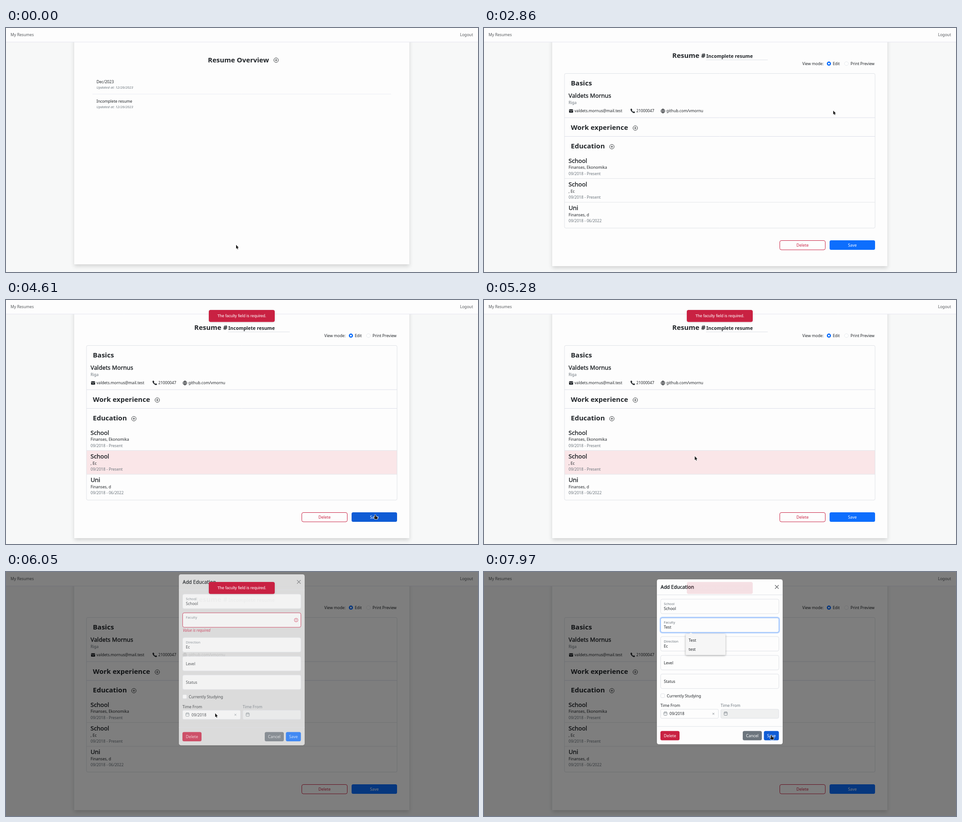
Animation of 1038x539 px, one loop 8 s. Source, as an HTML page with a canvas:

```html
<!DOCTYPE html>
<html lang="en">
<head>
<meta charset="utf-8">
<title>Resume editor</title>
<style>
  html, body { margin: 0; height: 100%; overflow: hidden; background: #f7f8f8; }
  canvas { display: block; }
</style>
</head>
<body>
<canvas id="stage" width="1038" height="539"></canvas>
<script>
const ctx = document.getElementById('stage').getContext('2d');
const LOOP = 8000;
const INK = '#212529', GRAY = '#6c757d', LINE = '#dfe2e7', RED = '#c92142';
const BLUE = '#0d6efd', DEEP_BLUE = '#0f5cd5', WHITE = '#fdfdfd';

// Times of the story, in ms
const OPEN_PAGE = 2350, SAVE = 3800, OPEN_MODAL = 5790, FOCUS = 6590, MENU = 6630;
const KEYS = [6920, 7010, 7100, 7190], TOAST_OUT = 7800;

// Pointer stops: time, x, y
const STOPS = [
  [30, 506, 479], [1800, 766, 169], [2760, 766, 169], [3560, 812, 475],
  [4610, 812, 475], [5280, 463.5, 345], [5900, 463.5, 345],
  [6530, 439, 117], [7330, 439, 117], [7940, 632, 361]
];

const HAND = new Path2D('M-1.2 .6Q-1.2-.5 0-.5T1.2 .6V3.2L4.6 4Q5.6 4.4 5.4 5.6L4.4 9.3H-.4L-3.2 6Q-3.6 4.8-2.6 4.6L-1.2 5.4Z');
const ARROW = new Path2D('M0 0V8.6L1.9 6.9 3.2 9.8 4.6 9.2 3.3 6.3H5.9Z');
const PHONE = new Path2D('M.6 1Q2-.6 2.8 .6L4 2.4Q4.2 3 3.2 4 4.4 6.2 6.4 7.2 7.4 6 8 6.3L9.8 7.4Q10.4 8 9.4 9.2 8.4 10.4 6.4 9.6 1.8 7.4 .3 3 0 1.8 .6 1Z');

let mouse, active, cursor;

const clamp = v => Math.min(1, Math.max(0, v));
const progress = (t, start, length) => clamp((t - start) / length);

function pointerAt(t) {
  let i = STOPS.findIndex(s => s[0] > t);
  if (i < 0) return STOPS[STOPS.length - 1].slice(1);
  if (i === 0) return STOPS[0].slice(1);
  const [t0, x0, y0] = STOPS[i - 1], [t1, x1, y1] = STOPS[i];
  const p = (t - t0) / (t1 - t0), e = p * p * (3 - 2 * p);
  return [x0 + (x1 - x0) * e, y0 + (y1 - y0) * e];
}

function over(x, y, w, h) {
  const [mx, my] = mouse;
  return active && mx >= x && mx <= x + w && my >= y && my <= y + h;
}

function text(s, x, y, { size = 8.6, color = INK, weight = 400, style = 'normal', align = 'left', family = '"Noto Sans", "Open Sans"' } = {}) {
  const medium = weight === 500;
  ctx.font = `${style} ${medium ? 400 : weight} ${size}px ${family}, sans-serif`;
  ctx.textAlign = align;
  ctx.fillStyle = color;
  ctx.fillText(s, x, y);
  if (medium) {
    ctx.strokeStyle = color;
    ctx.lineWidth = 0.4;
    ctx.strokeText(s, x, y);
  }
}

const heading = (s, x, y) => text(s, x, y, { size: 15, weight: 700 });

function box(x, y, w, h, fill, stroke, r = 3.5, width = 1) {
  ctx.beginPath();
  ctx.roundRect(x, y, w, h, r);
  if (fill) { ctx.fillStyle = fill; ctx.fill(); }
  if (stroke) { ctx.strokeStyle = stroke; ctx.lineWidth = width; ctx.stroke(); }
}

function shadowBox(x, y, w, h, fill, alpha, dy, blur, r = 0) {
  ctx.save();
  ctx.shadowColor = `rgba(0,0,0,${alpha})`;
  ctx.shadowOffsetY = dy;
  ctx.shadowBlur = blur;
  box(x, y, w, h, fill, null, r);
  ctx.restore();
}

function line(color, width, ...pts) {
  ctx.beginPath();
  for (let i = 0; i < pts.length; i += 4) {
    ctx.moveTo(pts[i], pts[i + 1]);
    ctx.lineTo(pts[i + 2], pts[i + 3]);
  }
  ctx.strokeStyle = color;
  ctx.lineWidth = width;
  ctx.stroke();
}

function circle(x, y, r, fill, stroke, width = 1) {
  box(x - r, y - r, 2 * r, 2 * r, fill, stroke, r, width);
}

function plus(x, y, color = INK) {
  circle(x, y, 5, null, color, 0.9);
  line(color, 0.9, x - 2.6, y, x + 2.6, y, x, y - 2.6, x, y + 2.6);
}

function cross(x, y, r, color, width) {
  line(color, width, x - r, y - r, x + r, y + r, x - r, y + r, x + r, y - r);
}

function button(s, x, y, w, h, fill, hoverFill, color = '#fff', border) {
  const hot = over(x, y, w, h);
  if (hot) cursor = 'hand';
  box(x, y, w, h, hot ? hoverFill : fill, border);
  text(s, x + w / 2, y + h / 2 + 3.2, { size: 8.8, color, align: 'center' });
}

const primary = (s, x, y, w, h) => button(s, x, y, w, h, BLUE, DEEP_BLUE);
const outline = (s, x, y, w, h) => button(s, x, y, w, h, null, null, RED, RED);

function frame(bottom) {
  ctx.fillStyle = '#f7f8f8';
  ctx.fillRect(0, 0, 1038, 539);
  shadowBox(150, 20, 737, bottom - 20, WHITE, 0.15, 4.5, 9);
  ctx.fillStyle = WHITE;
  ctx.fillRect(0, 0, 1038, 31);
  line('#e4e5f0', 1, 0, 31, 1038, 31);
  text('My Resumes', 10, 18.3, { color: '#55585b' });
  text('Logout', 1027, 18.3, { color: '#55585b', align: 'right' });
}

function overview() {
  frame(522);
  heading('Resume Overview', 444, 75.5);
  plus(594, 71);
  const hot = over(190, 146, 657, 43);
  if (hot) box(190, 146, 657, 43, '#f6f7f8', null, 0);
  line('#ebecf3', 1, 190, 146, 847, 146);
  ['Dec/2023', 'Incomplete resume'].forEach((name, i) => {
    const y = 121.8 + i * 43.5;
    text(name, 199, y);
    text('Updated at: 12/26/2023', 199, y + 11.8, { size: 7.6, style: 'italic', color: GRAY });
  });
  if (hot) {
    primary('Edit', 761, 161, 30, 19.5);
    outline('Delete', 796.5, 161.5, 41, 19);
  }
}

function contacts() {
  box(187, 179.5, 9, 7.5, INK, null, 1);
  ctx.beginPath();
  ctx.moveTo(187.5, 181);
  ctx.lineTo(191.5, 184);
  ctx.lineTo(195.5, 181);
  ctx.strokeStyle = WHITE;
  ctx.lineWidth = 0.9;
  ctx.stroke();
  text('valdets.mornus@mail.test', 199, 185.6);

  ctx.save();
  ctx.translate(322, 178);
  ctx.fillStyle = INK;
  ctx.fill(PHONE);
  ctx.restore();
  text('21000047', 335, 185.6);

  circle(393.5, 183.3, 4.5, null, INK, 0.8);
  ctx.beginPath();
  ctx.ellipse(393.5, 183.3, 2, 4.5, 0, 0, 7);
  ctx.stroke();
  line(INK, 0.7, 389, 183.3, 398, 183.3, 393.5, 179, 393.5, 188, 390, 181, 397, 181, 390, 185.7, 397, 185.7);
  text('github.com/vmornu', 401, 185.6);
}

function editor(t) {
  frame(526);
  heading('Resume #', 414, 66);
  text('Incomplete resume', 489, 65.6, { size: 10.5, weight: 700 });
  line(LINE, 1, 488, 70.5, 624, 70.5);

  text('View mode:', 700, 82);
  circle(758.5, 78.7, 4.6, BLUE);
  circle(758.5, 78.7, 1.9, '#fff');
  text('Edit', 767, 82);
  circle(797, 78.7, 4.2, '#fff', LINE, 0.8);
  text('Print Preview', 806, 82);

  if (t < OPEN_MODAL - 10) {
    ctx.fillStyle = `rgba(220,30,50,${0.1 * progress(t, SAVE, 150)})`;
    ctx.fillRect(177, 333, 683, 52);
  }
  box(177, 100.5, 683, 341.5, null, LINE, 3);
  line('#dcdee9', 1, 177, 198, 860, 198, 177, 239.5, 860, 239.5);
  line('#e3e5e9', 1, 177, 332.5, 860, 332.5, 177, 385, 860, 385);

  heading('Basics', 191, 126.6);
  text('Valdets Mornus', 186, 154.2, { size: 12.8, weight: 500 });
  text('Riga', 186, 167.6, { color: GRAY });
  contacts();

  heading('Work experience', 191, 225);
  plus(332.7, 221);
  heading('Education', 191, 266.4);
  const pressed = t > OPEN_MODAL - 10 && t < OPEN_MODAL + 150;
  if (pressed) box(268.5, 252.5, 25, 19, '#cfd1d3', '#b9bcbf', 3);
  plus(281.2, 262.2, pressed ? GRAY : INK);

  [
    ['School', 'Finanses, Ekonomika', '09/2018 - Present'],
    ['School', ', Ec', '09/2018 - Present'],
    ['Uni', 'Finanses, d', '09/2018 - 06/2022']
  ].forEach(([school, field, dates], i) => {
    const y = 297.5 + i * 52.3;
    text(school, 186, y, { size: 13.1, weight: 500 });
    text(field, 186, y + 13.7);
    text(dates, 186, y + 27, { color: GRAY });
  });

  outline('Delete', 650.5, 469.5, 100, 20.5);
  primary('Save', 760, 469, 100, 21);
}

function field(label, y, value) {
  box(388.5, y, 260, 32, WHITE, LINE);
  if (value === undefined) return text(label, 395.5, y + 19.3);
  text(label, 395.5, y + 13, { size: 7.5, color: GRAY });
  text(value, 395.5, y + 23.8);
}

function dateBox(x, y, value) {
  text('Time From', x, y - 4.3, { color: value ? INK : GRAY });
  box(x + 0.5, y + 0.5, 127, 20, value ? WHITE : '#eff0f0', LINE, 2.5);
  box(x + 7.5, y + 6.8, 7, 7, null, GRAY, 1, 0.8);
  line(GRAY, 0.8, x + 7.5, y + 9, x + 14.5, y + 9, x + 9.5, y + 5.5, x + 9.5, y + 7.5, x + 12.5, y + 5.5, x + 12.5, y + 7.5);
  if (value) {
    text(value, x + 20, y + 13.7);
    cross(x + 116.5, y + 10.5, 2, GRAY, 0.8);
  }
}

function facultyField(t, value) {
  const focused = t >= FOCUS, bad = !value;
  const rgb = bad ? '201,33,66' : '13,110,253';
  field('Faculty', 101.3, value);
  if (focused) box(387.3, 100, 262.4, 34.5, null, `rgba(${rgb},.25)`, 4.5, 2.3);
  box(388.5, 101.3, 260, 32, null, bad ? RED : '#86b7fe');
  if (over(388, 101, 261, 33)) cursor = 'beam';
  if (bad) {
    circle(638, 117.3, 4, null, RED, 0.9);
    line(RED, 1, 638, 115, 638, 118, 638, 118.8, 638, 119.8);
    text('Value is required', 389, 143.4, { size: 8.2, style: 'italic', color: RED });
  }
  if (focused) {
    const lastEvent = KEYS.filter(k => k <= t).pop() || FOCUS;
    if ((t - lastEvent) % 1000 < 500) {
      ctx.font = '8.6px "Noto Sans", "Open Sans", sans-serif';
      const x = 396 + ctx.measureText(value).width;
      line(INK, 0.9, x, 117, x, 127);
    }
  }
}

function suggestions() {
  shadowBox(443.5, 137, 87.5, 46.5, '#f6f6f6', 0.35, 1, 4, 2);
  ctx.beginPath();
  ctx.moveTo(451, 137.3);
  ctx.lineTo(455, 133.5);
  ctx.lineTo(459, 137.3);
  ctx.fillStyle = '#f6f6f6';
  ctx.fill();
  text('Test', 450, 154.2, { size: 8.8 });
  text('test', 450, 174.2, { size: 8.8 });
}

function modal(t) {
  const value = 'Test'.slice(0, KEYS.filter(k => k <= t).length);
  const up = value ? -13.3 : 0;
  const slide = 1 - progress(t, OPEN_MODAL + 150, 300);
  ctx.save();
  ctx.globalAlpha = progress(t, OPEN_MODAL + 150, 150);
  ctx.translate(0, -28 * slide * slide);
  active = slide === 0;

  box(380, 16, 277, 378 + up, WHITE, 'rgba(0,0,0,.175)', 4.5);
  text('Add Education', 388.5, 36.8, { size: 10.8, weight: 500 });
  cross(644, 33, 4, '#5c5f62', 1.1);
  line(LINE, 1, 380, 50.5, 657, 50.5);

  field('School', 60, 'School');
  facultyField(t, value);

  ctx.translate(0, up);
  field('Direction', 156, 'Ec');
  field('Level', 197.5);
  field('Status', 238.7);
  box(388.7, 282.2, 8.6, 8.6, WHITE, LINE, 2);
  text('Currently Studying', 402, 290);
  dateBox(388, 316, '09/2018');
  dateBox(520.5, 316);
  line(LINE, 1, 380, 354.5, 657, 354.5);
  ctx.translate(0, -up);

  const y = 364.5 + up;
  button('Delete', 388, y, 42, 20.5, RED, RED);
  button('Cancel', 569, y, 42, 20.5, GRAY, GRAY);
  primary('Save', 615.5, y, 33, 20.5);
  if (t >= MENU) suggestions();
  ctx.restore();
}

function toast(t) {
  const rest = Math.pow(1 - progress(t, SAVE, 350), 3);
  const fade = Math.pow(1 - progress(t, TOAST_OUT, 400), 3.7);
  ctx.save();
  ctx.globalAlpha = (1 - rest / 2) * fade;
  ctx.translate(0, -52 * rest);
  shadowBox(446, 22, 145, 26.5, RED, 0.1, 1, 5, 4);
  text('The faculty field is required.', 518.5, 38, {
    size: 8.8, color: '#fff', align: 'center', family: '"Liberation Sans", Arial'
  });
  ctx.restore();
}

function drawCursor() {
  const [x, y] = mouse;
  if (cursor === 'beam') {
    line('#333', 1, x + 0.5, y - 4, x + 0.5, y + 5, x - 1.5, y - 4, x + 2.5, y - 4, x - 1.5, y + 5, x + 2.5, y + 5);
    return;
  }
  const shape = cursor === 'hand' ? HAND : ARROW;
  ctx.save();
  ctx.translate(x, y);
  ctx.strokeStyle = '#fff';
  ctx.lineWidth = 1.4;
  ctx.stroke(shape);
  ctx.fillStyle = '#1c1c1c';
  ctx.fill(shape);
  ctx.restore();
}

function draw(t) {
  mouse = pointerAt(t);
  active = t < OPEN_MODAL;
  cursor = 'arrow';
  if (t < OPEN_PAGE) overview(); else editor(t);
  if (t > OPEN_MODAL) {
    ctx.fillStyle = `rgba(0,0,0,${0.5 * progress(t, OPEN_MODAL, 150)})`;
    ctx.fillRect(0, 0, 1038, 539);
    modal(t);
  }
  if (t >= SAVE) toast(t);
  drawCursor();
}

const start = performance.now();
function tick() {
  draw((performance.now() - start) % LOOP);
  requestAnimationFrame(tick);
}
tick();
</script>
</body>
</html>
```
